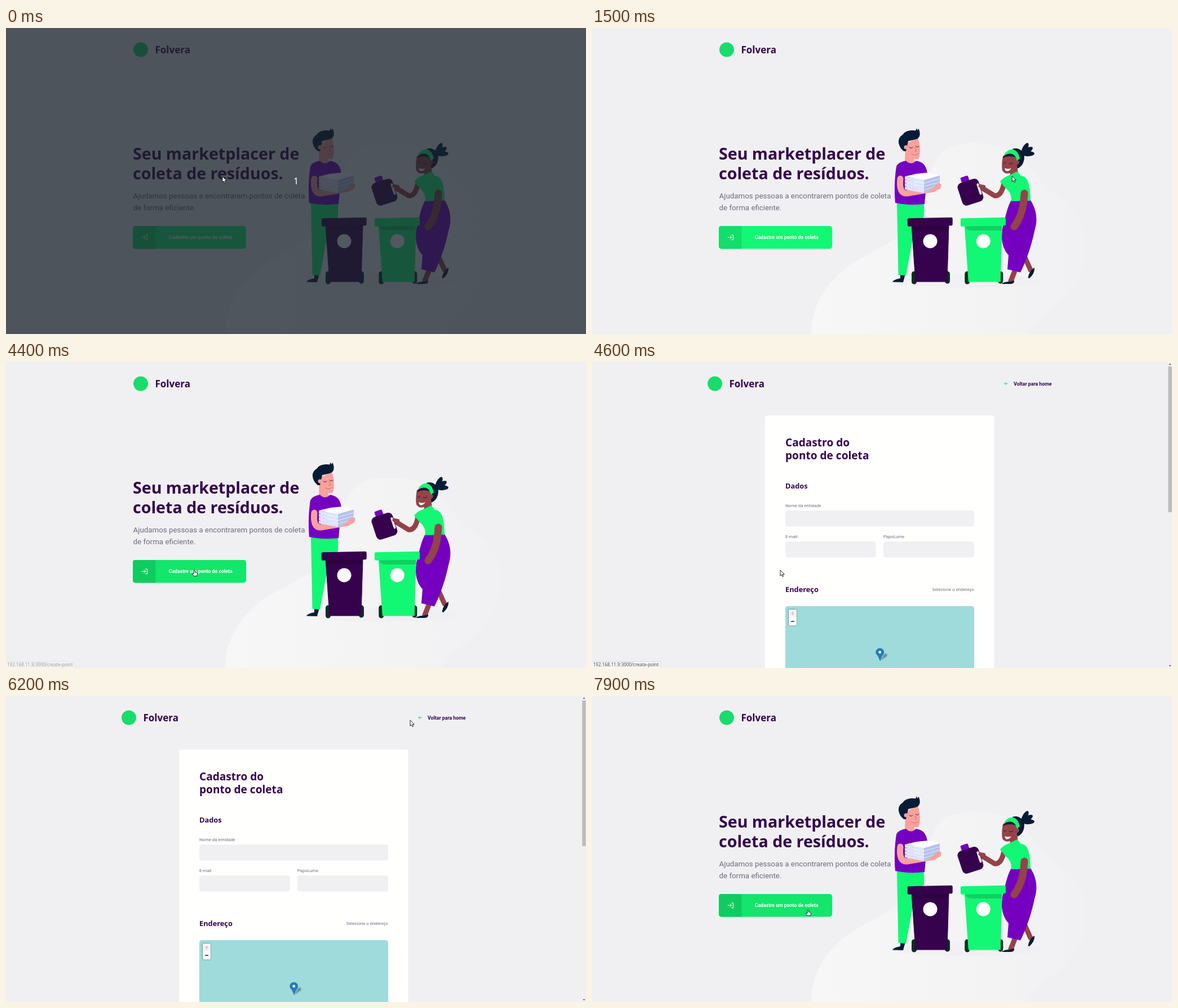
Animation, 1029 px wide and 544 px high, one loop 8000 ms. Source, as an HTML page:

```html
<!DOCTYPE html>
<html lang="pt-BR">
<head>
<meta charset="utf-8">
<title>Coleta de resíduos</title>
<style>
html, body { margin: 0; width: 100%; height: 100%; overflow: hidden; background: #f0f0f2; }
svg { display: block; width: 100vw; height: 100vh; }
text { font-family: Roboto, sans-serif; fill: #6c6c80; white-space: pre; }
.title { font-family: "Noto Sans", sans-serif; font-weight: 700; fill: #34034d; }
.hero { font-size: 28.6px; }
.head { font-size: 19.1px; }
.section { font-size: 12.8px; }
.body { font-size: 13.33px; }
.label { font-size: 7.79px; }
.link { font-size: 8.75px; font-weight: 700; fill: #34034d; }
.ui { font-family: "Noto Sans", sans-serif; }
.input { fill: #f0f0f2; }
.night { fill: #061c36; }
.plum { fill: #36024d; }
.violet { fill: #7500c0; }
.green { fill: #13f874; }
.pink { fill: #f8a19d; }
.brown { fill: #944348; }
.line { fill: none; stroke-linecap: round; stroke-linejoin: round; }
#cursor path { fill: #fff; stroke: #111; stroke-width: .9; stroke-linejoin: round; }
#button .base { fill: #13f874; }
#button .side { fill: #12de69; }
#button.hover .base { fill: #12e66b; }
#button.hover .side { fill: #10cc60; }
</style>
</head>
<body>
<svg viewBox="0 0 1029 544" preserveAspectRatio="none">
<defs>
  <linearGradient id="sheen" x1="0" x2="1">
    <stop offset="0" stop-color="#f7f7f7"/>
    <stop offset="1" stop-color="#f1f1f3"/>
  </linearGradient>
  <filter id="soft" x="-50%" y="-50%" width="200%" height="200%"><feGaussianBlur stdDeviation="1.3"/></filter>
  <g id="brand">
    <circle cx="239" cy="38.5" r="13" fill="#18dd6c"/>
    <text class="title" x="264.5" y="45" font-size="17">Folvera</text>
  </g>
  <g id="bin">
    <path class="line" stroke="#08301f" stroke-width="9" d="M571.5 437V451M630.5 437V450"/>
    <path d="M567 350H633L630 451H574Z" fill="currentColor" stroke="currentColor" stroke-linejoin="round"/>
    <path d="M568 352H633V360H580Q569 360 568 352Z" opacity=".16"/>
    <path d="M562 340.500L637.500 339V349L562 350.500Z" fill="currentColor" stroke="currentColor" stroke-width="4.500" stroke-linejoin="round"/>
    <circle cx="600" cy="379" r="12.500" fill="#fff"/>
  </g>
  <g id="book">
    <path d="M555 264L589 270V275.500L555 269Z" fill="#dde4fb"/>
    <path d="M589 270L617 262V267.500L589 275.500Z" fill="#b5c2eb"/>
    <path d="M555 264L576 259L597 257L617 262L589 270Z" fill="#fdfdff"/>
  </g>
  <ellipse id="lock" cx="11" rx="11" ry="4.500"/>
</defs>

<rect width="1029" height="544" fill="#f0f0f2"/>

<g id="home">
  <path fill="url(#sheen)" d="M389 544C388 490 422 444 466 416C510 389 546 379 568 344C592 304 592 251 620 222C642 199 700 200 738 216C778 234 786 270 822 296C862 325 880 354 877 398C874 448 842 482 806 506Q784 522 772 544Z"/>
  <ellipse cx="665" cy="450" rx="134" ry="12" fill="#ececef" opacity=".4"/>
  <use href="#brand"/>
  <text class="title hero" x="225" y="234">Seu marketplacer de</text>
  <text class="title hero" x="225" y="268.500">coleta de resíduos.</text>
  <text class="body" x="225.500" y="303">Ajudamos pessoas a encontrarem pontos de coleta</text>
  <text class="body" x="225.500" y="324">de forma eficiente.</text>

  <g id="button">
    <rect class="base" x="225" y="352" width="201" height="40.400" rx="4.500"/>
    <path class="side" d="M265.500 352H229.500Q225 352 225 356.500V388Q225 392.400 229.500 392.400H265.500Z"/>
    <path class="line" stroke="#fff" d="M241 372.300H247.500M245 369.700L247.600 372.300L245 374.900M247.500 368H250.500V376.600H247.500"/>
    <text class="link" x="288.700" y="375" style="fill:#fff">Cadastre um ponto de coleta</text>
  </g>

  <g id="man">
    <path class="night" d="M547 439H555.500L552 452L533 451.500Q535 447 547 445Z"/>
    <path class="green" d="M541 309L589 312V336L574 348L557 440L543.500 439Z"/>
    <path class="pink" d="M556 206L578 195C582 206 584 225 579 233L571 233L575 241H555Z"/>
    <path class="night" d="M548 214C542 204 542 195 552 189C555 183 565 181 574 182.500L576 178L577 182L579.500 179C583 187 583 196 574 198L561 201L557 219H553Z"/>
    <circle class="pink" cx="557" cy="212" r="3.500"/>
    <path class="line" stroke="#3b2030" d="M563 212Q566 215 569 212M574 210Q577 213 580 210"/>
    <path class="line" stroke="#cf6f73" d="M573 213L576 219H573M567 224Q573 228 579 223"/>
    <path class="violet" d="M540 246C544 238 553 237 557 236Q566 245 575 236C588 238 594 246 595 260L590 313Q561 316 538 311C536 290 537 264 540 246Z"/>
    <path class="line" stroke="#f8a19d" stroke-width="11" stroke-linecap="butt" d="M547 268Q544 294 558 294L606 286"/>
    <g id="books"></g>
    <path class="pink" d="M597 290L609 281Q613 275 619 277Q621 281 617 286L606 291Z"/>
  </g>

  <g id="woman">
    <path class="line" stroke="#944348" stroke-width="9" d="M768 408L778 430M750 432L743 450"/>
    <path class="night" d="M785 426Q786 436 776 445L773.500 444Q776 431 785 426ZM727 455Q731 451 739 451L749 449Q750 455 741 455Z"/>
    <path class="violet" d="M744 306H778C791 327 790 345 785 361C780 386 770 415 760 434.500L737 429L739 404C725 389 725 367 730 348C735 330 737 318 744 306Z"/>
    <path class="line" stroke="#944348" stroke-width="9" d="M731 276Q726 300 714 298L688 282"/>
    <g class="night">
      <g id="locks"></g>
      <path d="M746 215C756 211 767 219 767 229C767 240 762 247 754 250V226Z"/>
    </g>
    <path class="brown" d="M729 228C739 219 752 222 756 236Q760 237 757 241L754 244L756 259Q747 266 741 264L742 258Q732 261 728 253Q726 244 729 228Z"/>
    <path class="night" d="M728 232Q736 219 754 226L753 230Q738 225 728 232Z"/>
    <path class="green" d="M731 226C738 212 755 211 759 232L754 236C751 223 742 220 731 226Z"/>
    <path class="line" stroke="#3c1224" d="M730 239Q733 242 735 239M740 241Q744 243 747 240"/>
    <path d="M732 249Q739 252 744 249Q740 256 734 254Z" fill="#fff"/>
    <path class="green" d="M724 273C732 263 739 263 744 260L754 255Q760 260 760 263C774 262 778 282 778 307L744 308Q745 293 734 285Z"/>
    <path class="line" stroke="#944348" stroke-width="13" d="M767 294Q766 324 755 344L749 353"/>
  </g>

  <g id="jug" transform="rotate(-18 671 292)">
    <rect class="violet" x="662" y="262" width="14" height="11" rx="2"/>
    <rect class="plum" x="652" y="271" width="39" height="42" rx="8"/>
    <path class="line" stroke="#f4f4f5" stroke-width="4" d="M688 283V300"/>
    <path class="line" stroke="#944348" stroke-width="6" d="M691 287L697 290"/>
  </g>
  <use href="#bin" color="#36024d"/>
  <use href="#bin" x="94.300" color="#13f874"/>
</g>

<g id="form">
  <use href="#brand" x="-21"/>
  <path class="line" stroke="#18dd6c" d="M737.500 38.500H732M734.500 36L732 38.500L734.500 41"/>
  <text class="link" x="748" y="41.700">Voltar para home</text>
  <rect x="307" y="95" width="406.500" height="460" rx="4.500" fill="#fffffe"/>
  <text class="title head" x="343" y="150">Cadastro do</text>
  <text class="title head" x="343" y="173.300">ponto de coleta</text>
  <text class="title section" x="343" y="225">Dados</text>
  <g id="fields"></g>
  <text class="title section" x="343" y="408.500">Endereço</text>
  <text class="label" x="677.800" y="407" text-anchor="end">Selecione o endereço</text>
  <rect x="343" y="434" width="335" height="120" rx="4.500" fill="#9fdbdb"/>
  <rect x="347.800" y="439" width="16" height="30.500" rx="2.200" opacity=".28"/>
  <rect x="349" y="440" width="14" height="28.500" rx="1" fill="#fff"/>
  <rect x="349" y="440" width="14" height="14" rx="1" fill="#f4f4f4"/>
  <path class="line" stroke="#bbb" stroke-width="1.200" d="M353.500 447H358.500M356 444.500V449.500"/>
  <path class="line" stroke="#111" stroke-width="1.400" d="M353.700 461.300H358.300"/>
  <path d="M511 531L519 519Q525 517 523 523Z" fill="#234" opacity=".5" filter="url(#soft)"/>
  <path d="M511 531Q508 522 504.700 519.500A7 7 0 1 1 516.800 519.500Q513.500 523 511 531Z" fill="#247cc0" stroke="#2068a5" stroke-width=".6"/>
  <circle cx="510.700" cy="516" r="2.400" fill="#fff"/>
  <rect x="1022" width="7" height="544" fill="#f0f0f0"/>
  <rect x="1022.300" y="8" width="6.400" height="259" fill="#bdbdbd"/>
  <path d="M1023.500 5L1025.500 2.500L1027.500 5ZM1023.500 539L1025.500 541.500L1027.500 539Z" fill="#555"/>
</g>

<g id="status">
  <rect id="statusBox" x="-1" y="532.500" height="13" fill="#f5f5f5" stroke="#d5d5d5" stroke-width=".7"/>
  <text id="statusText" class="ui" x="2" y="541" font-size="8" style="fill:#505050"></text>
</g>

<g id="overlay">
  <rect width="1029" height="544" fill="#18202a" opacity=".75"/>
  <text class="ui" x="514.500" y="277.800" font-size="16" text-anchor="middle" style="fill:#fff">1</text>
</g>

<g id="cursor">
  <path id="arrow" d="M0 0V10.200L2.400 8L4 11.600L5.700 10.800L4.100 7.400H7.300Z"/>
  <path id="beam" d="M-2.300 -5H-.7V5H-2.300V6H2.300V5H.7V-5H2.300V-6H-2.300Z" style="stroke-width:.6;fill:#888"/>
  <path id="hand" d="M-.9 .6Q.2 -.6 1.200 .6V3.800L4.500 4.600Q5.700 5 5.500 6.500L4.700 10.500H-.8L-3.500 6.800Q-3.500 5.200 -2 5.800L-.9 6.700Z"/>
</g>
</svg>

<script>
const LOOP = 8000, STEP = 100;
const OPEN_FORM = 4500, GO_HOME = 7300;
const HOST = '192.168.11.9:3000';
const $ = id => document.getElementById(id);
const show = (id, on) => { $(id).style.display = on ? '' : 'none'; };

function add(parent, tag, attrs, text = '') {
  const el = document.createElementNS('http://www.w3.org/2000/svg', tag);
  for (const key in attrs) el.setAttribute(key, attrs[key]);
  el.textContent = text;
  $(parent).append(el);
}

function field(label, x, y, width) {
  add('fields', 'text', { class: 'label', x, y }, label);
  add('fields', 'rect', { class: 'input', x, y: y + 6, width, height: 28.5, rx: 4.5 });
}

field('Nome da entidade', 343, 258, 335);
field('E-mail', 343, 313, 160.7);
field('PapoLume', 517, 313, 161);
for (let i = 3; i >= 0; i--) add('books', 'use', { href: '#book', y: i * 6 });
for (let i = 0; i < 3; i++) add('locks', 'use', { href: '#lock', transform: `translate(763 224) rotate(${i * 30 - 62})` });

// Pointer moves: start, end, destination, optional bend
const moves = [
  [0, 200, [385, 313]],
  [300, 500, [376, 372]],
  [600, 1200, [598, 250], [480, -90]],
  [1200, 1900, [751, 235], [775, 295]],
  [2000, 2300, [736, 241]],
  [2400, 3000, [440, 246], [580, 190]],
  [3100, 4300, [334, 370], [205, 0]],
  [4700, 5300, [567, 92]],
  [5300, 5500, [669, 67]],
  [5500, 5700, [621, 66]],
  [5700, 6200, [717, 43]],
  [6300, 6800, [774, 36]],
  [GO_HOME, 7900, [383, 380]]
];

const mix = (a, b, p) => a.map((v, i) => v + (b[i] - v) * p);
const easeOut = u => 1 - (1 - u) ** 2;

function pointAt(t) {
  let at = [384, 264];
  for (const [start, end, to, bend = mix(at, to, .5)] of moves) {
    if (t <= start) break;
    const u = Math.min(1, (t - start) / (end - start));
    // A straight move has its bend halfway
    const p = easeOut(u);
    at = mix(mix(at, bend, p), mix(bend, to, p), p);
  }
  return at;
}

const over = (id, x, y) => {
  const b = $(id).getBBox();
  return x >= b.x && x <= b.x + b.width && y >= b.y && y <= b.y + b.height;
};

const texts = [...document.querySelectorAll('.hero, .body')];
texts.forEach((el, i) => { el.id = 'text' + i; });
const backLink = document.querySelector('#form .link');
backLink.id = 'back';

function statusAlpha(t) {
  const fade = start => Math.min(1, (t - start) / 400);
  if (t > 4200 && t < 4800) return fade(4200);
  if (t > 6500 && t < GO_HOME) return fade(6500);
  return 0;
}

function draw(t) {
  const [x, y] = pointAt(t);
  const onForm = t >= OPEN_FORM && t < GO_HOME;
  const counting = t < 100;
  show('home', !onForm);
  show('form', onForm);
  show('overlay', counting);

  const hover = !onForm && over('button', x, y);
  const onLink = onForm && t < 7100 && over('back', x, y);
  const onText = !onForm && !counting && texts.some(el => over(el.id, x, y));
  const kind = hover || onLink ? 'hand' : onText ? 'beam' : 'arrow';
  $('button').classList.toggle('hover', hover);
  for (const id of ['arrow', 'beam', 'hand']) show(id, id === kind);
  $('cursor').setAttribute('transform', `translate(${x} ${y})`);

  const toForm = t < 5000;
  $('status').style.opacity = statusAlpha(t);
  $('statusText').textContent = toForm ? HOST + '/create-point' : HOST;
  $('statusBox').setAttribute('width', toForm ? 123 : 73);
}

let start, last;
function tick(now) {
  start ??= now;
  const t = Math.floor(((now - start) % LOOP) / STEP) * STEP;
  if (t !== last) draw(last = t);
  requestAnimationFrame(tick);
}
draw(0);
requestAnimationFrame(tick);
</script>
</body>
</html>
```
